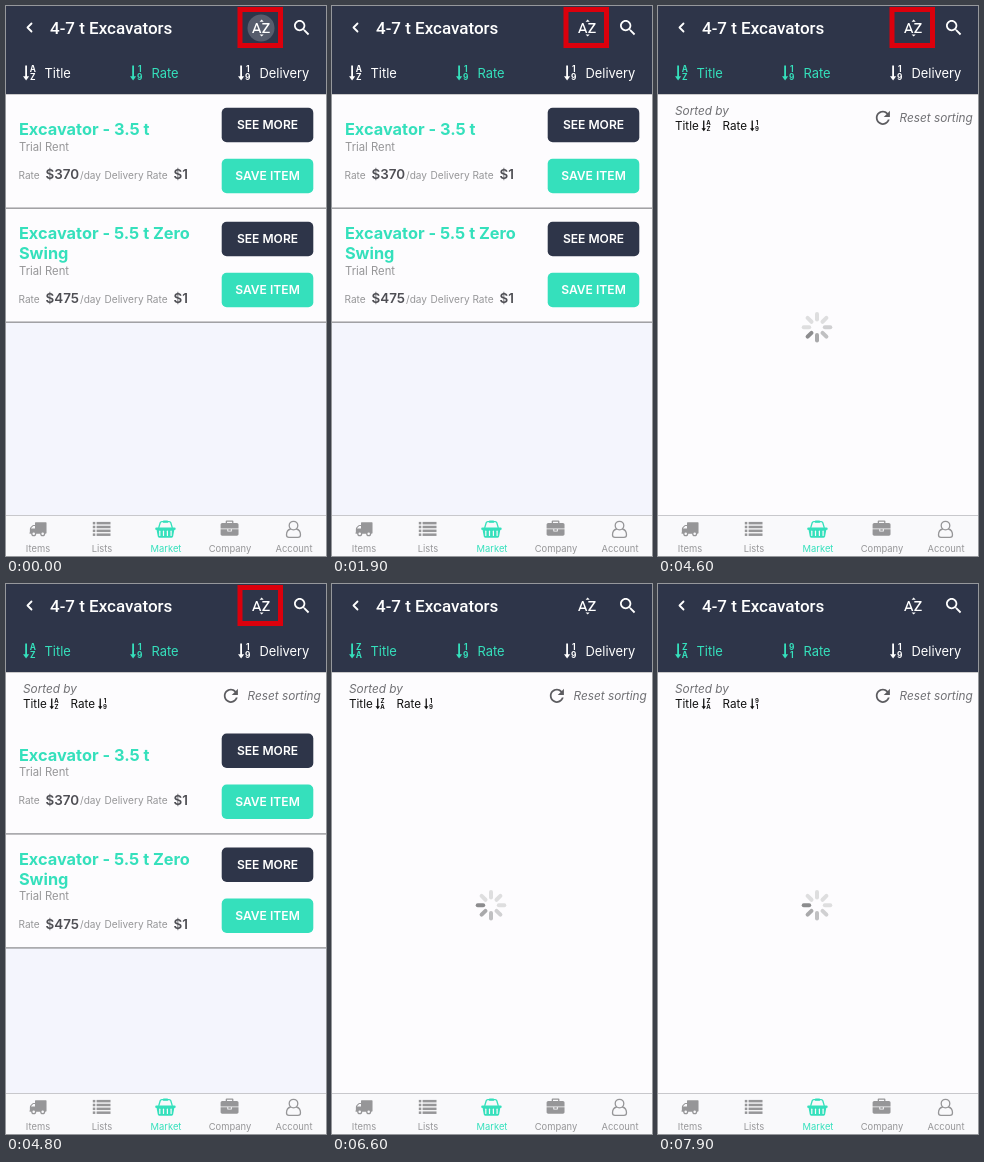
An HTML page for the animation above (8000 ms loop, 320x550 px).

```html
<!DOCTYPE html>
<html lang="en">
<head>
<meta charset="utf-8">
<style>
  html, body { margin: 0; width: 100%; height: 100%; overflow: hidden; }
  svg { display: block; width: 320px; height: 550px; font-family: Inter, "Liberation Sans", sans-serif; }
</style>
</head>
<body>
<svg id="stage" viewBox="0 0 320 550"></svg>
<script>
const LOOP = 8000;
const NAVY = '#2e3549', TEAL = '#35e0bc', GRAY = '#969698', PAPER = '#fdfcfe';
const stage = document.getElementById('stage');

const text = (x, y, size, fill, str, extra = '') =>
  `<text x="${x}" y="${y}" font-size="${size}" fill="${fill}" ${extra}>${str}</text>`;
const rect = (x, y, w, h, fill, extra = '') =>
  `<rect x="${x}" y="${y}" width="${w}" height="${h}" fill="${fill}" ${extra}/>`;
const path = (d, fill, extra = '') => `<path d="${d}" fill="${fill}" ${extra}/>`;
const line = (d, color, width) =>
  path(d, 'none', `stroke="${color}" stroke-width="${width}" stroke-linecap="round" stroke-linejoin="round"`);
const glyph = (x, y, scale, d, fill) =>
  path(d, fill, `transform="translate(${x} ${y}) scale(${scale})"`);

const ALPHA = 'M14.94 4.66h-4.72l2.36-2.36zm-4.69 14.71h4.66l-2.33 2.33zM6.1 6.27L1.6 17.73h1.84l.92-2.45h5.11l.92 2.45h1.84L7.74 6.27H6.1zm-1.13 7.37l1.94-5.18 1.94 5.18H4.97zm10.76 2.5h6.12v1.59h-8.53v-1.29l5.92-8.56h-5.88v-1.6h8.3v1.26l-5.93 8.6z';
const SEARCH = 'M15.5 14h-.79l-.28-.27C15.41 12.59 16 11.11 16 9.5 16 5.91 13.09 3 9.5 3S3 5.91 3 9.5 5.91 16 9.5 16c1.61 0 3.09-.59 4.23-1.57l.27.28v.79l5 4.99L20.49 19l-4.99-5zm-6 0C7.01 14 5 11.99 5 9.5S7.01 5 9.5 5 14 7.01 14 9.5 11.99 14 9.5 14z';
const RELOAD = 'M17.65 6.35C16.2 4.9 14.21 4 12 4c-4.42 0-7.99 3.58-7.99 8s3.57 8 7.99 8c3.73 0 6.84-2.55 7.73-6h-2.08c-.82 2.33-3.04 4-5.65 4-3.31 0-6-2.69-6-6s2.69-6 6-6c1.66 0 3.14.69 4.22 1.78L13 11h7V4l-2.35 2.35z';
const TRUCK = 'M640 1408a128 128 0 1 0-256 0 128 128 0 1 0 256 0zM256 896h384V640H482q-13 0-22 9L265 844q-9 9-9 22zM1536 1408a128 128 0 1 0-256 0 128 128 0 1 0 256 0zM1792 320v1024q0 64-128 64a256 256 0 0 1-512 0H768a256 256 0 0 1-512 0h-64q-128 0-128-64 0-64 64-64V960q0-120 46-171l198-198q45-45 109-45h160V320q0-64 64-64h1024q64 0 64 64z';
const CASE = 'M640 256h512v-128h-512v128zm1152 640v480q0 66-47 113t-113 47h-1472q-66 0-113-47t-47-113v-480h672v160q0 26 19 45t45 19h320q26 0 45-19t19-45v-160h672zm-768 0v128h-256v-128h256zm768-480v384h-1792v-384q0-66 47-113t113-47h352v-160q0-40 28-68t68-28h576q40 0 68 28t28 68v160h352q66 0 113 47t47 113z';

// Down arrow beside two stacked characters
function sortIcon(x, y, scale, pair, color) {
  const char = (c, dy) => text(9.8, dy, 8.3, color, c, 'font-weight="700" text-anchor="middle"');
  return `<g transform="translate(${x} ${y}) scale(${scale})">
    ${rect(2.2, 0, 1.8, 12, color)}${path('M0 10.8H6.2L3.1 15Z', color)}
    ${char(pair[0], 6.2)}${char(pair[1], 14.8)}</g>`;
}

function header(s) {
  const tab = (x, label, pair, on) => {
    const color = on ? TEAL : '#fff';
    return sortIcon(x, 59.5, 1, pair, color) + text(x + 21.5, 72, 12.9, color, label);
  };
  return rect(0, 0, 320, 88, NAVY) + rect(0, 88, 320, 1, '#000', 'opacity=".2"') +
    line('M25.5 17.5L21.5 21.5L25.5 25.5', '#fff', 1.8) +
    text(44, 28, 17, '#fff', '4-7 t Excavators', 'font-weight="500" font-family="Roboto, sans-serif"') +
    `<circle id="touch" cx="255" cy="22" r="13.5" fill="#fff" opacity="0"/>` +
    glyph(244.7, 11.6, .87, ALPHA, '#fff') + glyph(285.4, 11.3, .87, SEARCH, '#fff') +
    tab(17, 'Title', s.title, s.sorted) + tab(124, 'Rate', s.rate, true) + tab(232, 'Delivery', '19', false) +
    (s.boxed ? rect(234, 3.5, 40.5, 36, 'none', 'stroke="#dc000c" stroke-width="5"') : '');
}

function sortBar(s) {
  const italic = 'font-style="italic"';
  return text(17, 109, 11.8, '#707074', 'Sorted by', italic) +
    text(17, 124, 11.7, '#111', 'Title') + sortIcon(43.5, 114.5, .72, s.title, '#111') +
    text(64.5, 124, 11.7, '#111', 'Rate') + sortIcon(92, 114.5, .72, s.rate, '#111') +
    glyph(214.3, 101.3, .88, RELOAD, '#5c5c60') +
    text(241.5, 116, 11.8, '#707074', 'Reset sorting', italic);
}

const ITEMS = [
  { name: ['Excavator - 3.5 t'], price: '$370', top: 41 },
  { name: ['Excavator - 5.5 t Zero', 'Swing'], price: '$475', top: 31 }
];

function row(item, y) {
  const hireY = item.top + 20 * (item.name.length - 1) + 15.5;
  const rateY = hireY + 28;
  const button = (by, fill, label) => rect(215.7, by, 91.6, 34.5, fill, 'rx="5"') +
    text(261.5, by + 21.5, 12.1, '#fff', label, 'font-weight="600" text-anchor="middle"');
  const small = (x, str) => text(x, rateY, 10.1, GRAY, str);
  const bold = (x, str) => text(x, rateY + .5, 13.4, '#4e4e54', str, 'font-weight="600"');
  return `<g transform="translate(0 ${y})">` +
    item.name.map((n, i) => text(12.9, item.top + 20 * i, 16.35, TEAL, n, 'font-weight="700"')).join('') +
    text(13, hireY, 11.3, GRAY, 'Trial Rent') +
    small(12.5, 'Rate') + bold(39.5, item.price) + small(74, '/day') +
    small(98.5, 'Delivery Rate') + bold(167.5, '$1') +
    button(13.8, NAVY, 'SEE MORE') + button(64.8, TEAL, 'SAVE ITEM') +
    rect(0, 113.5, 320, 1.4, '#98989c') + '</g>';
}

function list(s) {
  const top = s.sorted ? 135.7 : 88;
  const items = s.title === 'ZA' ? [...ITEMS].reverse() : ITEMS;
  return rect(0, 88, 320, 422, '#f4f5fd') + rect(0, 88, 320, top + 140, PAPER) +
    items.map((item, i) => row(item, top + 114 * i)).join('');
}

// Eight spokes; the darkest one leads clockwise
function spinner(step) {
  const tones = ['#8c8c8e', '#a9a9ab', '#c0c0c2', '#d0d0d2'];
  let out = rect(0, 88, 320, 422, PAPER);
  for (let i = 0; i < 8; i++) {
    const age = (step + 5 - i + 16) % 8;
    out += rect(157, 306, 4, 9.5, tones[age] || '#dededf', `rx="2" transform="rotate(${i * 45} 159 321.3)"`);
  }
  return out;
}

function footer() {
  const icons = [
    glyph(22.6, 513.6, .01, TRUCK, GRAY),
    [0, 1, 2, 3].map(i => {
      const y = 515.9 + 3.84 * i;
      return rect(86.8, y, 2.5, 2.5, GRAY) + rect(90.6, y, 13.9, 2.5, GRAY);
    }).join(''),
    line('M152.8 521.5L154.2 516.8Q154.5 515.7 155.8 515.7H163.2Q164.5 515.7 164.8 516.8L166.2 521.5', TEAL, 1.3) +
      rect(157, 514.5, 5, 2.3, TEAL, 'rx=".6"') + rect(149.2, 521.5, 20.5, 2.6, TEAL, 'rx="1.3"') +
      path('M150.6 524H168.3L167.1 530.6Q166.9 531.7 165.8 531.7H153.1Q152 531.7 151.8 530.6Z', TEAL) +
      [153.8, 157.5, 161.4, 165.1].map(x => rect(x - .6, 524.6, 1.2, 5.4, '#f9f9fb', 'rx=".6"')).join(''),
    glyph(214.6, 514.4, .01, CASE, GRAY),
    line('M284.5 523C280.5 524 280.5 527 280.5 529Q280.5 531.3 283 531.3H292Q294.5 531.3 294.5 529C294.5 527 294.5 524 290.5 523', GRAY, 1.3) +
      `<circle cx="287.5" cy="519.6" r="4.3" fill="none" stroke="${GRAY}" stroke-width="1.3"/>`
  ];
  const labels = ['Items', 'Lists', 'Market', 'Company', 'Account'];
  return rect(0, 509.5, 320, 40.5, '#f9f9fb') + rect(0, 509, 320, 1, '#c8c8cc') + icons.join('') +
    labels.map((label, i) =>
      text(32 + 64 * i, 546, 9.4, i === 2 ? TEAL : GRAY, label, 'text-anchor="middle"')).join('');
}

const LOADS = [[4600, 4800], [6500, 6800], [7800, LOOP]];

function stateAt(t) {
  const load = LOADS.find(([from, to]) => t >= from && t < to);
  return {
    sorted: t >= 4600,
    boxed: t < 5400,
    title: t >= 6500 ? 'ZA' : 'AZ',
    rate: t >= 7800 ? '91' : '19',
    spin: load ? Math.floor((t - load[0]) / 100) : -1
  };
}

let shown = '';
function draw() {
  const t = performance.now() % LOOP;
  const s = stateAt(t);
  const key = JSON.stringify(s);
  if (key !== shown) {
    stage.innerHTML = (s.spin < 0 ? list(s) : spinner(s.spin)) +
      (s.sorted ? sortBar(s) : '') + header(s) + footer();
    shown = key;
  }
  document.getElementById('touch').setAttribute('opacity', .2 * Math.max(0, Math.min(1, (400 - t) / 300)));
  requestAnimationFrame(draw);
}
draw();
</script>
</body>
</html>
```
